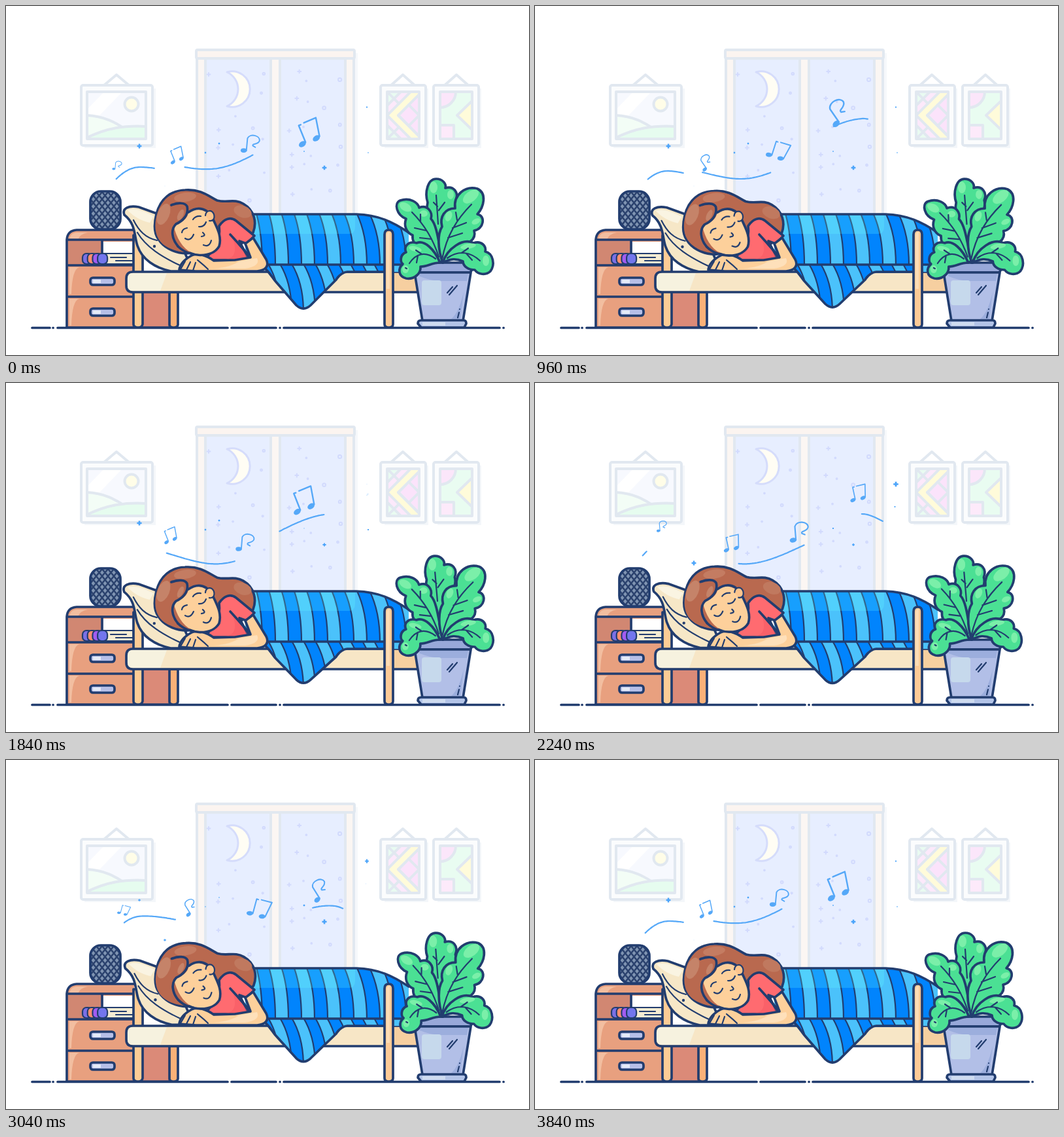
Recreate the animation shown at these times as an HTML page. Size 800 px wide and 533 px high, loop 3.88 s.

```html
<!DOCTYPE html>
<html lang="en">
<head>
<meta charset="utf-8">
<title>Lullaby</title>
<style>
html,body{margin:0;width:100%;height:100%;overflow:hidden;background:#fff}
svg{display:block;width:100vw;height:100vh}
.ink{stroke:#223d6f;stroke-width:3.7;stroke-linecap:round;stroke-linejoin:round}
.thin{stroke-width:2.2}
.none{fill:none}
.pale{stroke:#e1e8f0;stroke-width:4;stroke-linejoin:round;stroke-linecap:round}
.leaf{fill:#4be094}
.shine{fill:#7befa9}
.tune{stroke:#55a8f8;fill:none;stroke-linecap:round;stroke-linejoin:round;stroke-width:2.2}
.tune ellipse{fill:#55a8f8;stroke:none}
</style>
</head>
<body>
<svg viewBox="0 0 800 533">
<defs>
  <pattern id="mesh" width="9" height="11" patternUnits="userSpaceOnUse" x="129" y="284">
    <rect width="9" height="11" fill="#7f94b2"/>
    <path d="M-1-1.2 10 12.2M10-1.2-1 12.2" stroke="#2b426e" stroke-width="2.5"/>
  </pattern>
  <clipPath id="sheet"><path d="M366 318H536C570 319 592 330 616 346V395H366Z"/></clipPath>
  <clipPath id="fold"><path id="foldShape"/></clipPath>
  <clipPath id="art1"><path d="M124 131H214V203H124Z"/></clipPath>
  <clipPath id="art2"><path d="M583 131H632V203H583Z"/></clipPath>
  <clipPath id="art3"><path d="M664 131H713V203H664Z"/></clipPath>
</defs>
<rect width="800" height="533" fill="#fff"/>

<g id="window">
  <path d="M297 72H538V318H297Z" fill="#f6f8fb"/>
  <path class="pale" d="M292 80H532V320H292Z" fill="#fbf6f3"/>
  <path class="pale" d="M305 80H405V320H305ZM419 80H519V320H419Z" fill="#e7eeff"/>
  <rect class="pale" x="291" y="67" width="242" height="13" rx="2" fill="#fbf4f0"/>
  <path d="M338 101A27.2 27.2 0 1 1 338 153A28.4 28.4 0 0 0 338 101Z" fill="#fffdf4" stroke="#d5dcfb" stroke-width="3" stroke-linejoin="round"/>
  <g id="stars" stroke="#d2dafd" stroke-width="2" fill="none"></g>
</g>

<g id="pictures">
  <path d="M120 126H229V217H120ZM579 126H646V217H579ZM660 126H727V217H660Z" fill="#f4f7fa"/>
  <path class="pale none" d="M150 121 169 105 188 121M589 121 607 105 625 121M671 121 689 105 707 121"/>
  <g class="pale" fill="#fbfcfd">
    <rect x="115" y="121" width="109" height="92" rx="3"/>
    <rect x="573" y="121" width="69" height="92" rx="3"/>
    <rect x="654" y="121" width="69" height="92" rx="3"/>
  </g>
  <g clip-path="url(#art1)">
    <path d="M124 131H214V203H124Z" fill="#f7f9fe"/>
    <path d="M150 131H178L124 187V158Z" fill="#fff"/>
    <circle class="pale" cx="192" cy="150" r="10.5" fill="#fffde8"/>
    <path class="pale" d="M122 167C150 168 168 178 182 188V203H122Z" fill="#f3fdf6"/>
    <path class="pale" d="M122 202C154 186 182 182 216 184V205H122Z" fill="#e6fcef"/>
  </g>
  <g clip-path="url(#art2)" class="pale">
    <path d="M583 131H632V203H583Z" fill="#fce9fb"/>
    <path d="M583 131H604L583 152ZM583 182 604 203H583Z" fill="#e9fbf1"/>
    <path d="M600 167 632 135V199Z" fill="#fbe3fb"/>
    <path d="M619 131H636L600 167 636 203H619L583 167Z" fill="#fffbda"/>
    <path class="none" d="M583 131 601 149M583 203 601 185M600 167 632 199M616 151 632 167 616 183"/>
  </g>
  <g clip-path="url(#art3)" class="pale">
    <path d="M664 131H713V203H664Z" fill="#e9fcf1"/>
    <circle cx="664" cy="131" r="24" fill="#fbe6fa"/>
    <path d="M714 144 690 167 714 190Z" fill="#fffbda"/>
    <path d="M663 182H685V204H663Z" fill="#fdeafa"/>
  </g>
  <path class="pale none" d="M124 131H214V203H124ZM583 131H632V203H583ZM664 131H713V203H664Z"/>
</g>

<path class="ink none" d="M40 491.500H67M72 491.500h.1M79 491.500H339M345 491.500H413M419 491.500h.1M425 491.500H755M761 491.500h.1"/>

<g id="stand">
  <path d="M93 491V357Q94 343 108 342H196V491Z" fill="#e8a07f"/>
  <path d="M95 358H146V396H95Z" fill="#d18772"/>
  <path d="M146 360H196V396H146Z" fill="#fff"/>
  <path d="M97 357Q98 346 109 346H125Q113 348 110 357ZM97 399H112Q101 402 100 440H97ZM97 447H112Q101 450 100 488H97Z" fill="#f2bea0"/>
  <path class="ink thin" d="M148 378H196V394H148Z" fill="#f5ecd3"/>
  <path class="ink none thin" d="M160 384H184M168 389H194"/>
  <g id="books" class="ink thin"></g>
  <path class="ink none" d="M93 491V357Q94 343 108 342H196M93 357H196M93 396H196M93 444H196M93 491H200M147 359V377"/>
  <g class="ink" fill="#b6bfe8">
    <rect x="129" y="415" width="37" height="11" rx="4"/>
    <rect x="129" y="462" width="37" height="11" rx="4"/>
  </g>
  <path d="M133 418H145V423H133ZM133 465H145V470H133Z" fill="#e5ebf8"/>
  <rect class="ink" x="129" y="283" width="46" height="58" rx="16" fill="url(#mesh)"/>
  <path d="M209 437H250V491H209Z" fill="#db8a78"/>
  <path class="ink" d="M250 437H263V487Q262 491 257 491Q250 491 250 487Z" fill="#fbb178"/>
  <path class="ink none" d="M209 491H250"/>
  <path class="ink" d="M195 350H209V486Q208 491 202 491Q195 491 195 486Z" fill="#fdcc95"/>
</g>

<g id="pillow">
  <path class="ink" d="M181 319C177 309 188 304 203 307L250 324 286 405H252C228 400 208 387 201 366C196 352 199 333 181 319Z" fill="#f6e7c7"/>
  <path d="M186 312C198 308 211 313 226 321L220 331C207 328 197 323 186 312Z" fill="#faf4e2"/>
  <path class="ink none thin" d="M195 327C203 343 213 354 231 358M201 346C214 368 238 383 266 396"/>
  <circle cx="227" cy="367" r="2.200" fill="#223d6f"/>
</g>

<g id="bed">
  <path class="ink" d="M585 406H640V437H585Z" fill="#f6cfa0"/>
  <path class="ink" d="M194 406H585V437H194Q184 437 184 427V416Q184 406 194 406Z" fill="#f7e6c6"/>
  <path d="M194 408H246L236 435H194Q186 434 186 427V416Q187 408 194 408Z" fill="#f6f2df"/>
  <path d="M366 318H536C570 319 592 330 616 346V395H366Z" fill="#4bc2fb"/>
  <g clip-path="url(#sheet)">
    <g id="stripes"></g>
    <path d="M366 318H534V338Q534 348 524 348H366Z" fill="#6ff" opacity=".22"/>
  </g>
  <path class="ink none" d="M366 318H536C570 319 592 330 616 346"/>
  <g clip-path="url(#fold)">
    <path d="M390 394H605V470H390Z" fill="#4bc2fb"/>
    <g id="foldStripes"></g>
  </g>
  <path id="foldLine" class="ink none"/>
  <path class="ink none" d="M392 395H606"/>
  <path class="ink" d="M579 349Q579 342 585.500 342Q592 342 592 349V486Q592 491 585.500 491Q579 491 579 486Z" fill="#fdca96"/>
  <path d="M582 350Q583 345 587 345V432H582Z" fill="#fddcb5"/>
</g>

<g id="girl">
  <g id="hairBack">
    <path class="ink" d="M276 378C254 377 240 367 233 356C225 345 227 330 230 318C236 294 252 282 274 281C297 279 311 291 323 297C337 301 350 294 363 302C380 312 384 330 378 346L355 368Z" fill="#b9694f"/>
    <ellipse cx="362" cy="314" rx="14" ry="9" transform="rotate(20 362 314)" fill="#c0795f"/>
  </g>
  <path class="ink" d="M326 336C334 324 344 322 352 328L380 351 368 363 357 359 372 388H302C318 374 329 359 326 336Z" fill="#ff6b70"/>
  <path d="M345 350 372 387H334C352 386 354 371 345 350Z" fill="#f4555f" opacity=".45"/>
  <path class="ink none" d="M343 349 354 361 374 384"/>
  <path class="ink" d="M378 354 366 363 374 384 350 388 318 389C307 381 293 376 284 381C273 387 266 394 265 403L290 405H384C397 404 403 397 398 387Z" fill="#fdd09b"/>
  <path d="M356 390 384 385Q390 397 366 401H318Q344 399 356 390Z" fill="#fee0ba"/>
  <path class="ink none thin" d="M274 390 267 402M282 391 276 403M290 392 286 404M293 388C298 392 302 395 309 402"/>
  <g id="head">
    <path d="M255 329C258 347 266 365 279 374C295 382 318 382 326 367C331 351 321 336 315 318L279 304Z" fill="#fdd09b"/>
    <path d="M276 376C253 374 239 366 233 355C226 343 228 326 232 315C240 293 259 281 279 283C299 284 313 296 320 312L308 313C299 309 289 310 279 315C278 326 268 330 260 334C252 341 254 355 263 367Z" fill="#b9694f"/>
    <path class="ink none" d="M263 367C280 384 315 386 326 367C331 351 321 336 317 326"/>
    <path class="ink thin" d="M305 320C306 311 315 311 318 318C320 325 316 329 311 328" fill="#fdc58d"/>
    <ellipse cx="241" cy="318" rx="9" ry="17" transform="rotate(22 241 318)" fill="#c58369"/>
    <ellipse cx="274" cy="292" rx="17" ry="7" transform="rotate(-8 274 292)" fill="#c47c62"/>
    <ellipse cx="267" cy="319" rx="4" ry="9" transform="rotate(25 267 319)" fill="#c58369"/>
    <path class="ink none" d="M253 304C263 300 274 300 277 306C280 320 269 329 260 333C252 341 253 355 263 367M279 315C289 308 299 308 307 313"/>
    <path class="ink none thin" d="M274 355Q282 360 287 349M295 337Q303 338 306 330M269 346Q270 340 277 339M286 326Q290 320 298 321M301 346Q307 351 299 352"/>
    <path id="mouth" class="ink none thin"/>
  </g>
</g>

<g id="plant">
  <path class="ink" d="M620 397Q620 392 625 392H710Q716 392 716 398L710 407H627Z" fill="#98a8d9"/>
  <path class="ink" d="M625 407H711L699 481H637Z" fill="#b2bfe7"/>
  <path d="M630 409H707L705 420H665Q650 420 633 413ZM681 478Q694 467 700 436L695 478Z" fill="#9caedd"/>
  <rect x="636" y="419" width="30" height="38" rx="4" fill="#c6d9ec"/>
  <path class="ink none thin" d="M675 438 683 429M678 441 690 427M694 463V463M693 468 691 476"/>
  <path class="ink" d="M630 485Q630 480 635 480H700Q704 480 704 485L701 491H635Z" fill="#b3c4e8"/>
  <path d="M637 483H672V488H637Z" fill="#cfdcf0"/>
  <g id="leafTop">
    <path class="ink leaf" d="M668 392C655 350 640 320 645 300C640 285 645 264 658 264C668 264 674 272 672 278C685 274 693 285 688 297C692 311 680 320 676 330C668 350 668 375 668 392Z"/>
    <ellipse class="shine" cx="654" cy="277" rx="6" ry="9"/>
    <ellipse class="shine" cx="680" cy="288" rx="5" ry="7"/>
    <path class="ink none thin" d="M658 289 661 333M660 306 654 300M662 312 671 300"/>
  </g>
  <g id="leafLeft">
    <path class="ink leaf" d="M668 392C640 385 620 365 622 350C612 346 608 335 612 325C597 319 593 301 603 297C618 292 630 300 632 308C645 303 653 315 650 325C660 335 662 365 668 392Z"/>
    <ellipse class="shine" cx="611" cy="307" rx="10" ry="6" transform="rotate(30 611 307)"/>
    <ellipse class="shine" cx="639" cy="317" rx="6" ry="5"/>
    <path class="ink none thin" d="M621 315C640 334 653 355 662 383M634 330 634 318M643 343 625 339M651 356 633 354"/>
  </g>
  <g id="leafRight">
    <path class="ink leaf" d="M668 392C660 370 660 348 667 337C663 322 671 309 687 309C684 288 703 274 721 279C736 286 731 307 721 318C734 320 731 341 716 343C720 357 705 366 695 362C685 372 675 380 668 392Z"/>
    <ellipse class="shine" cx="711" cy="291" rx="14" ry="8" transform="rotate(-38 711 291)"/>
    <ellipse class="shine" cx="677" cy="321" rx="5" ry="8" transform="rotate(20 677 321)"/>
    <ellipse class="shine" cx="719" cy="329" rx="7" ry="4" transform="rotate(-25 719 329)"/>
    <path class="ink none thin" d="M712 303C690 325 674 350 667 387M690 327 688 315M683 339 704 331M676 354 698 347"/>
  </g>
  <g id="leafLowR">
    <path class="ink leaf" d="M668 392C675 370 699 354 715 362C728 358 735 367 733 375C746 378 748 396 741 405C734 412 722 410 717 403C708 403 699 398 699 390C688 385 680 386 668 392Z"/>
    <ellipse class="shine" cx="707" cy="367" rx="12" ry="4" transform="rotate(-10 707 367)"/>
    <ellipse class="shine" cx="734" cy="389" rx="5" ry="8"/>
    <path class="ink none thin" d="M675 385C693 372 711 376 725 389M697 377 707 370M704 378 713 388"/>
  </g>
  <g id="leafLowL">
    <path class="ink leaf" d="M664 392C655 371 640 357 628 362C615 358 608 368 612 376C602 380 603 391 607 394C599 401 600 413 612 416C625 418 635 408 634 398C645 398 651 392 664 392Z"/>
    <ellipse class="shine" cx="626" cy="371" rx="10" ry="4" transform="rotate(15 626 371)"/>
    <ellipse class="shine" cx="611" cy="402" rx="5" ry="6"/>
    <path class="ink none thin" d="M657 386C641 374 627 378 617 393M636 379 627 373M630 381 628 392M611 400 613 401"/>
  </g>
</g>

<g id="waves" class="tune"></g>
<g id="notes"></g>
<path id="sparks" fill="#4ba4fa"/>
</svg>
<script>
const CYCLE = 3840, LOOP = 3880, STEP = 40, TAU = 2 * Math.PI;
const $ = id => document.getElementById(id);
const add = (id, name, attrs) => {
  const el = document.createElementNS('http://www.w3.org/2000/svg', name);
  for (const k in attrs) el.setAttribute(k, attrs[k]);
  return $(id).appendChild(el);
};

// Night sky: one star per cell of a loose grid, clear of the moon
let seed = 11;
const rand = () => (seed = seed * 16807 % 2147483647) / 2147483647;
for (const left of [310, 424])
  for (let i = 0; i < 18; i++) {
    const x = left + i % 3 * 31 + 26 * rand(), y = 92 + Math.floor(i / 3) * 37 + 28 * rand();
    if (Math.hypot(x - 350, y - 127) < 34) continue;
    if (i % 3 === 0) add('stars', 'path', {d: `M${x - 3.3} ${y}h6.6M${x} ${y - 3.3}v6.6`});
    else add('stars', 'circle', {cx: x, cy: y, r: i % 3 === 1 ? .9 : .8 + 1.8 * rand()});
  }

['#7b70e6', '#ff8f70', '#a15cf1', '#7376ed'].forEach((fill, i) =>
  add('books', 'rect', {x: 117 + 7.7 * i, y: 378, width: 15, height: 16, rx: 6, fill}));

// Dark bands between neighbouring seams; seam(n, back) draws down or up
function stripe(id, count, seam) {
  for (let n = 0; n < count; n++) {
    if (n % 2 === 0)
      add(id, 'path', {d: `M${seam(n)}L${seam(n + 1, true)}Z`, fill: '#0184fd'});
    add(id, 'path', {d: 'M' + seam(n), class: 'ink none thin'});
  }
}
const bend = (x0, y0, x1, y1, back) => {
  const mid = `${x1} ${y0 + (y1 - y0) * .4}`;
  return back ? `${x1} ${y1}Q${mid} ${x0} ${y0}` : `${x0} ${y0}Q${mid} ${x1} ${y1}`;
};
stripe('stripes', 12, (n, back) => bend(383 + 19.2 * n, 317, 392 + 20 * n, 396, back));
stripe('foldStripes', 12, (n, back) => bend(383 + 18 * n, 394, 401 + 18 * n, 468, back));

// Stream of air: crests and troughs joined by smooth steps; drift fans it out
const knots = [[165, 268], [205, 246], [315, 264], [500, 200], [560, 220]];
function flow(x, drift) {
  let i = 0;
  while (i < 3 && x > knots[i + 1][0]) i++;
  const [x0, y0] = knots[i], [x1, y1] = knots[i + 1];
  const u = Math.min(1, Math.max(0, (x - x0) / (x1 - x0)));
  const ease = i ? u * u * (3 - 2 * u) : u * (2 - u);
  return y0 + (y1 - y0) * ease + drift * (x - 100) / 300;
}

const single = '<ellipse cx="-5" cy="14" rx="5.3" ry="3.8" transform="rotate(-20 -5 14)"/><path d="M-.5 13-6-8C-5-18 13-20 15-11C15-3 4-3 7 1L12 2"/>';
const paired = '<ellipse cx="-12" cy="14" rx="5.4" ry="3.7" transform="rotate(-15 -12 14)"/><ellipse cx="9" cy="13" rx="5.4" ry="3.7" transform="rotate(-15 9 13)"/><path d="M-7 13-8-12H-5M0-13 18-14 14 12"/>';
const notes = [single, paired, single, paired].map(shape => {
  const el = add('notes', 'g', {class: 'tune'});
  el.innerHTML = shape;
  return el;
});

function moveNote(el, i, t) {
  const since = t - i * CYCLE / 4, age = since > 0 || i === 0 ? since : since + CYCLE;
  const u = age / CYCLE;
  const x = 169 + 392 * u - 14 * (1 - u) * Math.sin(1.5 * TAU * u);
  const y = flow(x, 18 * Math.cos(i * TAU / 4 - .4)) - 24;
  const tilt = 20 * Math.cos(2 * TAU * u);
  const size = Math.min(.45 + .87 * u, 4.5 * (1 - u));
  el.setAttribute('transform', `translate(${x} ${y}) rotate(${tilt}) scale(${size})`);
}

const LIFE = 3150;
const waves = [{born: 3250, drift: 0}, {born: 2180, drift: -21}, {born: 360, drift: 17}];
for (const w of waves) w.el = add('waves', 'path', {});

function moveWave({el, born, drift}, t) {
  const v = (t - born + CYCLE) % CYCLE / LIFE;
  const tip = 165 + 400 * v - 14 * Math.sin(TAU * v);
  const tail = Math.max(167 + drift / 3, tip - 105 * Math.sin(Math.PI * v));
  const pts = [];
  if (v < 1)
    for (let x = tail; x < tip; x += 2) pts.push(x.toFixed(1) + ' ' + flow(x, drift).toFixed(1));
  el.setAttribute('d', pts.length > 1 ? 'M' + pts.join('L') : '');
}

// Twinkles: x, y, radius, moment of the peak within a beat
const BEAT = CYCLE / 4;
const sparks = [
  [204, 214, 3.6, .92], [243, 275, 3.7, .42], [552, 154.5, 3.8, .33],
  [550.5, 189, 1.2, .5], [487, 247, 3.7, .1], [456, 222, 1.3, .2],
  [326, 210, 1.3, .93], [305, 224, 1.2, .93], [554, 224, 1.2, .78]
];
function spark([x, y, max, peak], t) {
  const r = max * (.5 + .5 * Math.cos(TAU * (t / BEAT - peak)));
  const h = r * (r > 1.5 ? .36 : .8), k = r - h;
  return r < .2 ? '' : `M${x - h} ${y - r}h${2 * h}v${k}h${k}v${2 * h}h${-k}v${k}h${-2 * h}v${-k}h${-k}v${-2 * h}h${k}z`;
}

const turn = (id, deg, dx = 0) => $(id).setAttribute('transform', `translate(${dx} 0) rotate(${deg} 667 392)`);
const shift = (id, x, y) => $(id).setAttribute('transform', `translate(${x} ${y})`);

function draw(t) {
  const phase = TAU * t / CYCLE, s = Math.sin(phase), c = 1 - Math.cos(phase);

  turn('leafLeft', -1.3 * s);
  turn('leafRight', .75 * c);
  turn('leafTop', -.5 * c);
  turn('leafLowR', 0, 1.4 * s);
  turn('leafLowL', 0, -1.2 * s);

  shift('head', -.5 * s, .6 * s);
  shift('hairBack', -.8 * s, 1.5 * s);
  shift('pillow', -1.5 * s, .8 * s);
  $('mouth').setAttribute('d', `M302 ${365 + s}Q311 ${369 + s} 314 ${358 + 2.5 * s}`);

  const tip = 463 - 2 * c;
  const edge = `M391 397C399 401 405 411 411 419L444 ${tip - 6}Q455 ${tip + 4} 466 ${tip - 6}L505 418Q512 407 522 406`;
  $('foldShape').setAttribute('d', edge + 'H606V394H391Z');
  $('foldLine').setAttribute('d', edge + 'H578');

  notes.forEach((el, i) => moveNote(el, i, t));
  waves.forEach(w => moveWave(w, t));
  $('sparks').setAttribute('d', sparks.map(p => spark(p, t)).join(''));
}

function tick() {
  draw(Math.floor(performance.now() % LOOP / STEP) * STEP);
  requestAnimationFrame(tick);
}
tick();
</script>
</body>
</html>
```
